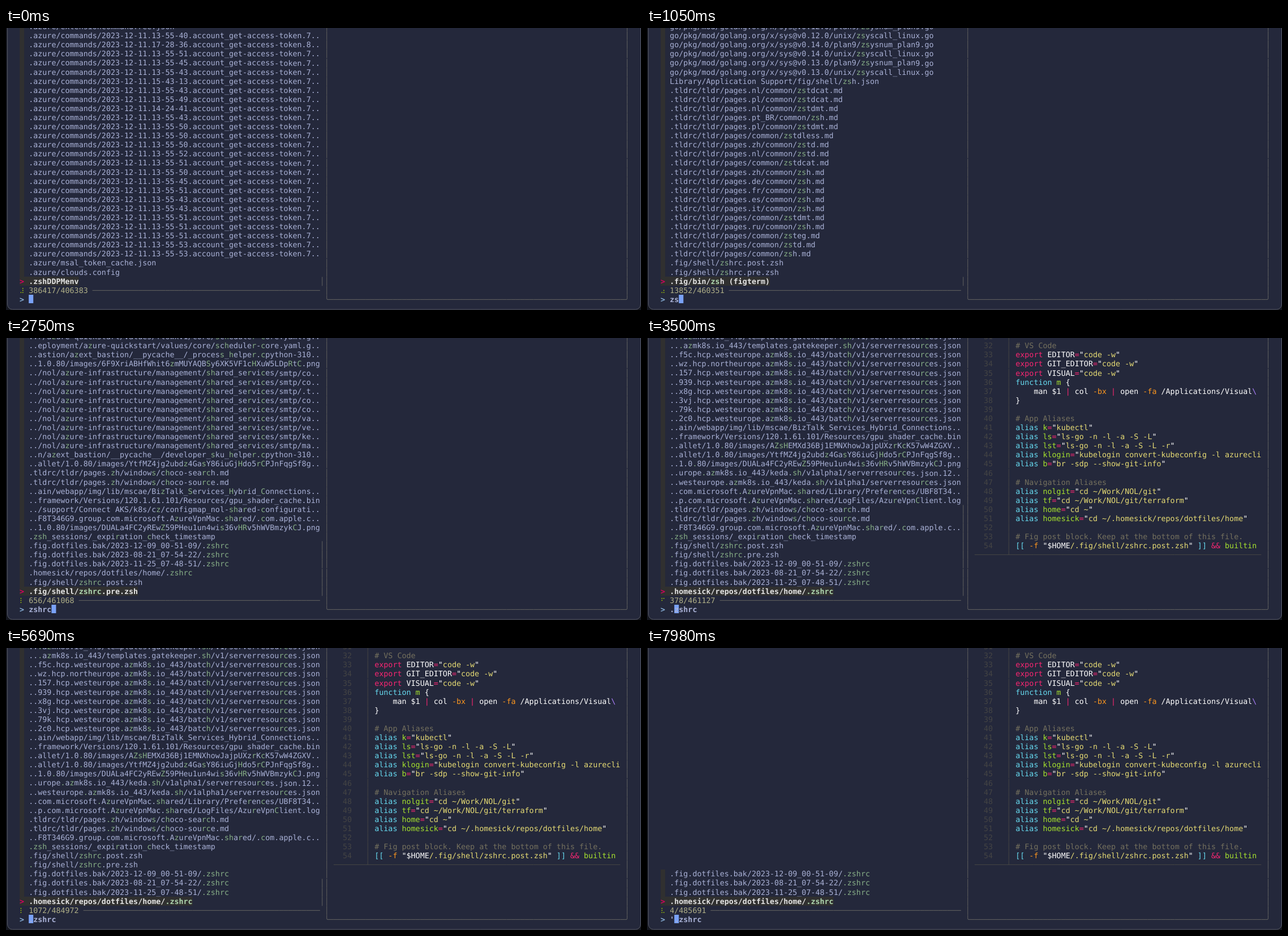
These frames come from a looping animation (1122 by 499 pixels, 8 s). An HTML page with a canvas:

```html
<!DOCTYPE html>
<html lang="en">
<head>
<meta charset="utf-8">
<title>Fuzzy finder</title>
<style>
html, body { margin: 0; width: 100%; height: 100%; overflow: hidden; background: #14161f; }
canvas { display: block; }
</style>
</head>
<body>
<canvas id="stage" width="1122" height="499"></canvas>
<script>
const ctx = document.getElementById('stage').getContext('2d');
const LOOP = 8000, CW = 8.04, RH = 16.091, BASE = 18.23, SELECTED = 27, INFO = 28, PROMPT = 29;
const FONT = '13.354px "DejaVu Sans Mono", monospace';
const BG = '#24283b', FG = '#a9b1d6', LINE = '#5f5f5f', GRID = '#444444', ROW_BG = '#303030';
const lines = s => s.trim().split('\n');

// ---- file lists, the last entry is the selected one ----
const stamps = ('13-55-40 17-28-36 13-55-51 13-55-45 13-55-43 15-43-13 13-55-43 13-55-49 14-24-41 ' +
  '13-55-43 13-55-50 13-55-50 13-55-50 13-55-52 13-55-51 13-55-50 13-55-45 13-55-51 13-55-43 ' +
  '13-55-43 13-55-51 13-55-51 13-55-51 13-55-53 13-55-53').split(' ');
const listAll = [
  '.azure/extensionCommandTree.json',
  ...stamps.map(s => `.azure/commands/2023-12-11.${s}.account_get-access-token.${s[1] === '7' ? 8 : 7}..`),
  '.azure/msal_token_cache.json', '.azure/clouds.config', '.zshDDPMenv'
];

const goSys = (v, f) => `go/pkg/mod/golang.org/x/sys@v0.${v}.0/${f}.go`;
const PLAN9 = 'plan9/zsysnum_plan9', UNIX = 'unix/zsyscall_linux';
const tldr = s => s.split(' ').map(p => {
  const [lang, name] = p.split(':');
  return `.tldrc/tldr/pages${lang && '.' + lang}/common/${name}.md`;
});
const listZs = [
  goSys(12, PLAN9), goSys(12, UNIX), goSys(14, PLAN9), goSys(14, UNIX), goSys(13, PLAN9), goSys(13, UNIX),
  'Library/Application Support/fig/shell/zsh.json',
  ...tldr('nl:zstdcat pl:zstdcat nl:zstdmt pt_BR:zsh pl:zstdmt :zstdless zh:zstd nl:zstd :zstdcat ' +
    'zh:zsh de:zsh fr:zsh es:zsh it:zsh :zstdmt ru:zsh :zsteg :zstd :zsh'),
  '.fig/shell/zshrc.post.zsh', '.fig/shell/zshrc.pre.zsh', '.fig/bin/zsh (figterm)'
];

const backups = ['2023-12-09_00-51-09', '2023-08-21_07-54-22', '2023-11-25_07-48-51']
  .map(d => `.fig.dotfiles.bak/${d}/.zshrc`);
const home = '.homesick/repos/dotfiles/home/.zshrc';
const post = '.fig/shell/zshrc.post.zsh', pre = '.fig/shell/zshrc.pre.zsh';

const listZshr = [...lines(`
..drawio/src/main/webapp/img/lib/azure2/compute/Shared_Image_G..
.tldrc/tldr/pages.zh/windows/pwsh-where.md
..rs/UBF8T346G9.group.com.microsoft.AzureVpnMac.shared/Library..
..llet/1.0.80/images/DAtU322C23YpoZyWBm8szk12QyqHa9rUQe1EYXzbm..
..rs/UBF8T346G9.group.com.microsoft.AzureVpnMac.shared/.com.ap..
..rs/UBF8T346G9.group.com.microsoft.AzureVpnMac.shared/LogFile..
..owser/BraveWallet/1.0.80/images/EzfgjvkSwthhgHaceR3LnKXUoRkP..
.tldrc/tldr/pages.zh/osx/gchgrp.md
.tldrc/tldr/pages.zh_TW/windows/chrome.md
.tldrc/tldr/pages.zh/common/bashmarks.md
Library/HTTPStorages/us.zoom.xos/httpstorages.sqlite-wal
Library/HTTPStorages/us.zoom.xos/httpstorages.sqlite-shm
Library/HTTPStorages/us.zoom.xos/httpstorages.sqlite
.tldrc/tldr/pages.zh/windows/chrome.md
.tldrc/tldr/pages.zh_TW/osx/gchroot.md
.pyenv/versions/3.9.18/lib/python3.9/test/ziptestdata/header.sh
..let/1.0.80/images/DUALa4FC2yREwZ59PHeu1un4wis36vHRv5hWVBmzyk..
.tldrc/tldr/pages.zh/osx/gchroot.md
.tldrc/tldr/pages.zh_TW/osx/gshred.md
.zsh_sessions/_expiration_check_timestamp
.tldrc/tldr/pages.zh/osx/gshred.md
.zsh_history
.fig/bin/zsh (figterm)`), ...backups, home, post, pre];

const listZshrc = [...lines(`
..r/azure-quickstart/values/flowxv1/core/scheduler-core.yaml.g..
..eployment/azure-quickstart/values/core/scheduler-core.yaml.g..
..astion/azext_bastion/__pycache__/_process_helper.cpython-310..
..1.0.80/images/6F9XriABHfWhit6zmMUYAQBSy6XK5VF1cHXuW5LDpRtC.png`),
  ...'co co .t co co va ve ke ma'.split(' ')
    .map(s => `../nol/azure-infrastructure/management/shared_services/smtp/${s}..`),
  ...lines(`
..n/azext_bastion/__pycache__/developer_sku_helper.cpython-310..
..allet/1.0.80/images/YtfMZ4jg2ubdz4GasY86iuGjHdo5rCPJnFqgSf8g..
.tldrc/tldr/pages.zh/windows/choco-search.md
.tldrc/tldr/pages.zh/windows/choco-source.md
..ain/webapp/img/lib/mscae/BizTalk_Services_Hybrid_Connections..
..framework/Versions/120.1.61.101/Resources/gpu_shader_cache.bin
../support/Connect AKS/k8s/cz/configmap_nol-shared-configurati..
..F8T346G9.group.com.microsoft.AzureVpnMac.shared/.com.apple.c..
..1.0.80/images/DUALa4FC2yREwZ59PHeu1un4wis36vHRv5hWVBmzykCJ.png
.zsh_sessions/_expiration_check_timestamp`), ...backups, home, post, pre];

const cluster = s => `..${s}europe.azmk8s.io_443/batch/v1/serverresources.json`;
const listDot = [
  '...azmk8s.io_443/templates.gatekeeper.sh/v1/serverresources.json',
  '...azmk8s.io_443/templates.gatekeeper.sh/v1/serverresources.json',
  ...'f5c.hcp.west wz.hcp.north 157.hcp.west 939.hcp.west x8g.hcp.west 3vj.hcp.west 79k.hcp.west 2c0.hcp.west'
    .split(' ').map(cluster),
  ...lines(`
..ain/webapp/img/lib/mscae/BizTalk_Services_Hybrid_Connections..
..framework/Versions/120.1.61.101/Resources/gpu_shader_cache.bin
..allet/1.0.80/images/AZsHEMXd36Bj1EMNXhowJajpUXzrKcK57wW4ZGXV..
..allet/1.0.80/images/YtfMZ4jg2ubdz4GasY86iuGjHdo5rCPJnFqgSf8g..
..1.0.80/images/DUALa4FC2yREwZ59PHeu1un4wis36vHRv5hWVBmzykCJ.png
..urope.azmk8s.io_443/keda.sh/v1alpha1/serverresources.json.12..
..westeurope.azmk8s.io_443/keda.sh/v1alpha1/serverresources.json
..com.microsoft.AzureVpnMac.shared/Library/Preferences/UBF8T34..
..p.com.microsoft.AzureVpnMac.shared/LogFiles/AzureVpnClient.log
.tldrc/tldr/pages.zh/windows/choco-search.md
.tldrc/tldr/pages.zh/windows/choco-source.md
..F8T346G9.group.com.microsoft.AzureVpnMac.shared/.com.apple.c..
.zsh_sessions/_expiration_check_timestamp`), post, pre, ...backups, home];
const listExact = [...backups, home];

// ---- preview: [colour key, text] pairs per line ----
const INK = { w: '#ffffff', y: '#e6db74', p: '#f92672', c: '#66d9ef', g: '#a6e22e', o: '#fd971f', v: '#ae81ff', k: '#75715e' };
const quoted = s => [['w', '"'], ['y', s], ['w', '"']];
const alias = (name, s) => [['c', 'alias '], ['g', name], ['p', '='], ...quoted(s)];
const env = name => [['p', 'export '], ['w', name], ['p', '='], ...quoted('code -w')];
const note = s => [['k', '# ' + s]];
const preview = [
  [], note('VS Code'), env('EDITOR'), env('GIT_EDITOR'), env('VISUAL'),
  [['c', 'function '], ['g', 'm'], ['w', ' {']],
  [['w', '    man $1 '], ['p', '|'], ['w', ' col '], ['o', '-bx '], ['p', '|'], ['w', ' open '], ['o', '-fa'],
    ['w', ' /Applications/Visual'], ['v', '\\']],
  [['w', '}']], [],
  note('App Aliases'), alias('k', 'kubectl'), alias('ls', 'ls-go -n -l -a -S -L'),
  alias('lst', 'ls-go -n -l -a -S -L -r'),
  alias('klogin', 'kubelogin convert-kubeconfig -l azurecli').slice(0, -1),
  alias('b', 'br -sdp --show-git-info'), [],
  note('Navigation Aliases'), alias('nolgit', 'cd ~/Work/NOL/git'), alias('tf', 'cd ~/Work/NOL/git/terraform'),
  alias('home', 'cd ~'), alias('homesick', 'cd ~/.homesick/repos/dotfiles/home'), [],
  note('Fig post block. Keep at the bottom of this file.'),
  [['c', '[['], ['o', ' -f '], ['w', '"$HOME'], ['y', '/.fig/shell/zshrc.post.zsh'], ['w', '" '], ['c', ']] '],
    ['p', '&& '], ['g', 'builtin']]
];

// ---- timeline ----
// [time, query, cursor, list, highlighted pattern]
const states = [
  [0, '', 0, listAll, ''],
  [910, 'z', 1, listZs, 'z'],
  [1040, 'zs', 2, listZs, 'zs'],
  [1130, 'zsh', 3, listZs, 'zs'],
  [1250, 'zshr', 4, listZshr, 'zshr'],
  [1340, 'zshrc', 5, listZshr, 'zshr'],
  [1390, 'zshrc', 5, listZshrc, 'zshrc'],
  [3200, 'zshrc', 0, listZshrc, 'zshrc'],
  [3480, '.zshrc', 1, listDot, '.zshrc'],
  [4680, '.zshrc', 0, listDot, '.zshrc'],
  [5800, "'.zshrc", 1, listExact, '.zshrc']
];
// [time, matches, total, spinner step]
const counts = [
  [0, 386417, 406383, 4.5], [830, 459800, 460351, 12.5], [905, 460351, 460351, 13.2],
  [905, 32418, 460351, 13.2], [1030, 32418, 460351, 15.3],
  [1030, 13852, 460351, 15.3], [1130, 13852, 460351, 16.3],
  [1130, 2105, 460351, 16.3], [1250, 2105, 460351, 17.5],
  [1250, 1041, 460351, 17.5], [1390, 1041, 460351, 18.9],
  [1390, 651, 460351, 18.9], [2739, 656, 461068, 28.5], [3470, 656, 461120, 40.2],
  [3470, 378, 461127, 40.2], [3540, 378, 461127, 40.8],
  [4340, 1010, 470600, 47.5], [5690, 1072, 484972, 58.5], [5800, 1072, 484972, 59.5],
  [5800, 4, 484972, 59.5], [7980, 4, 485691, 77.5], [8000, 4, 485691, 77.6]
];
// bursts of screen updates: [first, last, steps]
const ticks = [0];
for (const [a, b, n] of [[50, 830, 11], [910, 1700, 19], [1780, 2540, 12], [2660, 3450, 11], [3480, 4230, 10],
  [4350, 5100, 10], [5190, 5420, 4], [5600, 5690, 2], [5810, 6380, 7], [6500, 7260, 12], [7380, 7980, 8]])
  for (let i = 0; i < n; i++) ticks.push(a + (b - a) * i / (n - 1));

const lastBefore = (list, t, key) => list.reduce((r, x) => key(x) <= t + .01 ? x : r);

function countAt(t) {
  let i = 0;
  while (i < counts.length - 2 && counts[i + 1][0] <= t) i++;
  const a = counts[i], b = counts[i + 1], f = (t - a[0]) / (b[0] - a[0]);
  return a.map((v, k) => Math.floor(v + (b[k] - v) * f + 1e-6));
}

// ---- fuzzy match: best scoring positions of q in s ----
const word = c => /\w/.test(c) && c !== '_';
function bonus(s, i) {
  const c = s[i], p = s[i - 1] || '/';
  if (!word(c) || !word(p)) return 8;
  return /[a-z]/.test(p) && /[A-Z]/.test(c) || /\D/.test(p) && /\d/.test(c) ? 7 : 0;
}
function fuzzy(s, q) {
  if (!q) return [];
  const low = s.toLowerCase();
  let prev = [];
  for (let j = 0; j < q.length; j++) {
    const next = [];
    for (let i = s.startsWith('..') ? 2 : 0; i < s.length; i++) {
      if (low[i] !== q[j]) continue;
      const b = bonus(s, i);
      if (!j) { next.push({ i, score: 16 + 2 * b, run: b, path: [i] }); continue; }
      let best = null;
      for (const m of prev) {
        if (m.i >= i) break;
        const joined = m.i === i - 1;
        const run = joined ? Math.max(b, m.run, 4) : b;
        const score = m.score + 16 + run - (joined ? 0 : 1 + i - m.i);
        if (!best || score >= best.score) best = { i, score, run, m };
      }
      if (best) next.push({ ...best, path: [...best.m.path, i] });
    }
    prev = next;
  }
  return prev.length ? prev.reduce((a, b) => b.score > a.score ? b : a).path : [];
}
const cache = new Map();
function marks(s, q) {
  const key = q + '\n' + s;
  if (!cache.has(key)) cache.set(key, new Set(fuzzy(s, q)));
  return cache.get(key);
}

// ---- drawing ----
const rowTop = row => Math.round(472 - RH * (PROMPT - row));
function rect(x, y, w, h, color) { ctx.fillStyle = color; ctx.fillRect(x, y, w, h); }
function put(col, row, text, color, bold) {
  ctx.font = (bold ? 'bold ' : '') + FONT;
  ctx.textRendering = 'geometricPrecision';
  // a trace of skew keeps glyphs from snapping to whole pixels
  ctx.setTransform(1, 1e-4, 0, 1, 0, -.05);
  [...text].forEach((c, i) => {
    if (c === ' ') return;
    ctx.fillStyle = typeof color === 'function' ? color(i) : color;
    ctx.fillText(c, (col + i) * CW, BASE + RH * row);
  });
  ctx.resetTransform();
}
function bar(col, from, to, color) {
  for (let row = from; row <= to; row++) put(col, row, '│', color);
}

function drawWindow() {
  rect(0, 0, 1122, 499, '#14161f');
  ctx.beginPath();
  ctx.roundRect(2.5, -30, 1119, 528, 9);
  ctx.fillStyle = BG;
  ctx.fill();
  ctx.strokeStyle = '#585b68';
  ctx.stroke();
  bar(70, -1, 28, LINE);
  bar(136, -1, 28, LINE);
  put(70, PROMPT, '╰' + '─'.repeat(65) + '╯', LINE);
}

function drawList(list, pattern) {
  list.forEach((s, i) => {
    const row = SELECTED + 1 - list.length + i, sel = row === SELECTED, hit = marks(s, pattern);
    const y = rowTop(row);
    rect(3 * CW, y, (sel ? 2 + s.length : 1) * CW, rowTop(row + 1) - y, ROW_BG);
    const [on, off] = sel ? ['#afd7af', '#e4e4e4'] : ['#87af87', FG];
    put(5, row, s, k => hit.has(k) ? on : off, sel);
  });
  put(3, SELECTED, '>', '#d7005f', true);
}

function drawInfo(n, total, spin) {
  const dots = '⠋⠙⠹⠸⠼⠴⠦⠧⠇⠏'.charCodeAt(spin % 10) - 0x2800;
  for (let b = 0; b < 6; b++)
    if (dots >> b & 1) rect(b < 3 ? 25.7 : 29, 460 + b % 3 * 3.6, 1.5, 1.5, '#afd700');
  const text = n + '/' + total;
  put(5, INFO, text, '#afaf87');
  put(6 + text.length, INFO, '─'.repeat(63 - text.length), LINE);
  if (n > 63) bar(69, INFO - Math.max(1, Math.floor(4000 / n)), SELECTED, LINE);
}

function drawPrompt(query, cursor) {
  put(3, PROMPT, '>', '#87afd7', true);
  rect((5 + cursor) * CW, 472, CW, 15, '#7aa2f7');
  put(5, PROMPT, query, FG, true);
}

function drawPreview() {
  preview.forEach((parts, i) => {
    put(74, i - 1, String(31 + i), GRID);
    let col = 81;
    for (const [ink, text] of parts) {
      put(col, i - 1, text, INK[ink]);
      col += text.length;
    }
  });
  bar(79, -1, 22, GRID);
  put(72, 23, '─'.repeat(7) + '┴' + '─'.repeat(55), GRID);
}

function draw(now) {
  const t = lastBefore(ticks, now % LOOP, x => x);
  const [, query, cursor, list, pattern] = lastBefore(states, t, s => s[0]);
  const [, n, total, spin] = countAt(t);
  drawWindow();
  drawList(list, pattern);
  drawInfo(n, total, spin);
  drawPrompt(query, cursor);
  if (t >= 3479) drawPreview();
}

const start = performance.now();
(function loop() {
  draw(performance.now() - start);
  requestAnimationFrame(loop);
})();
</script>
</body>
</html>
```
